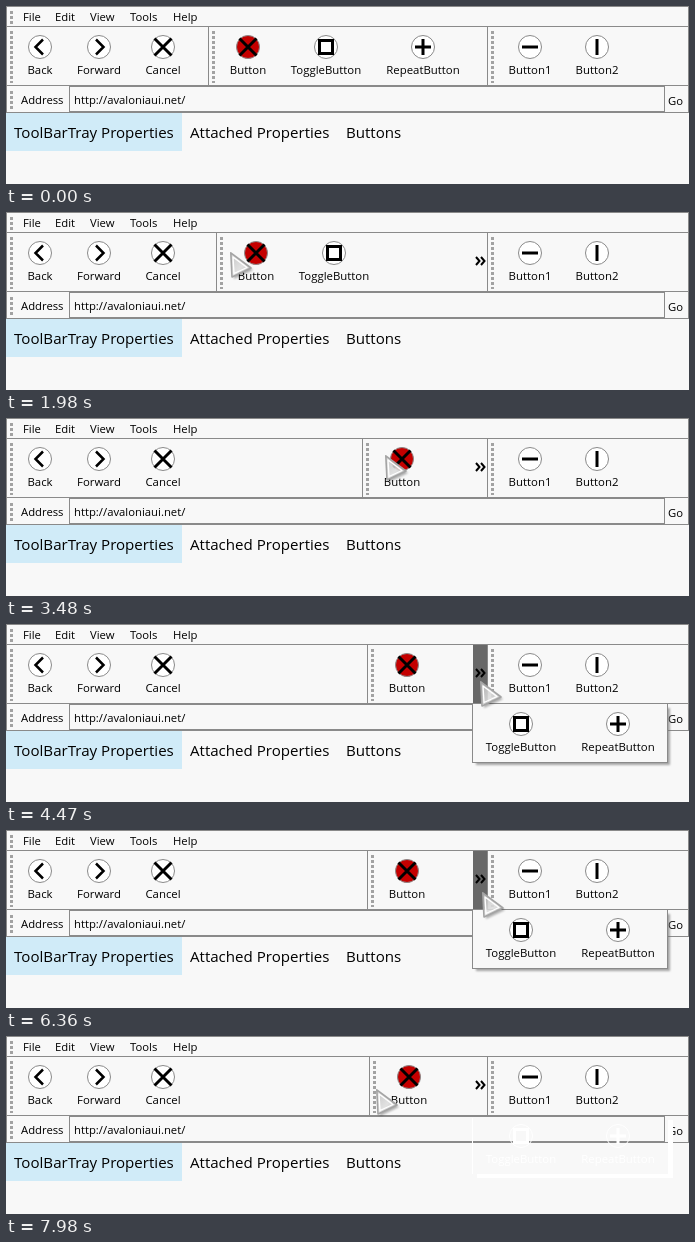
Recreate the animation shown at these times as an HTML page. Size 683x178 px, loop 8 s.

```html
<!DOCTYPE html>
<html lang="en">
<head>
<meta charset="utf-8">
<title>Toolbar tray</title>
<style>
html, body { margin: 0; width: 100%; height: 100%; overflow: hidden; background: #f8f8f8; }
svg { display: block; color: #000; --ring: #8a8a8a; --disc: #fff; }
text { font: 11.3px "Open Sans", "Noto Sans", sans-serif; fill: currentColor; }
.icon text { font-size: 11.4px; text-anchor: middle; }
.tab text { font-size: 15.1px; }
.line { fill: none; stroke: #8a8a8a; shape-rendering: crispEdges; }
.grip { fill: none; stroke: #a2a2a2; stroke-width: 3; stroke-dasharray: 3 2; shape-rendering: crispEdges; }
.icon circle { fill: var(--disc); stroke: var(--ring); }
.icon path { fill: none; stroke: currentColor; stroke-width: 3; }
.icon .thin { stroke-width: 2.5; }
#ghost { color: #fff; --ring: #fff; --disc: none; }
</style>
</head>
<body>
<svg width="683" height="178" viewBox="0 0 683 178">
  <defs>
    <linearGradient id="shine" x1="0" y1="0" x2="1" y2="1">
      <stop offset="0" stop-color="#ccc"/>
      <stop offset=".55" stop-color="#eee"/>
      <stop offset="1" stop-color="#c4c4c4"/>
    </linearGradient>
    <filter id="blur" x="-30%" y="-30%" width="160%" height="160%"><feGaussianBlur stdDeviation="1.2"/></filter>
    <g id="toggleBtn" class="icon">
      <circle r="11.5"/><path d="M-6.5 -6.5H6.5V6.5H-6.5Z"/><text y="27">ToggleButton</text>
    </g>
    <g id="repeatBtn" class="icon">
      <circle r="11.5"/><path d="M-8 0H8M0 -8V8"/><text y="27">RepeatButton</text>
    </g>
    <path id="cross" d="M-8.5 -8.5L8.5 8.5M8.5 -8.5L-8.5 8.5"/>
    <g id="extras">
      <use href="#toggleBtn" x="515" y="100"/>
      <use href="#repeatBtn" x="612" y="100"/>
    </g>
  </defs>

  <path class="line" d="M.5 106.5V.5H682.5V106.5ZM0 20.5H683M0 79.5H683M481.5 20V80M63.5 80.5H658.5V105.5H63.5Z"/>
  <path class="grip" d="M5.5 5V18M5.5 25V77M5.5 85V103M486.5 25V77"/>

  <text x="17" y="15">File</text>
  <text x="49" y="15">Edit</text>
  <text x="84" y="15">View</text>
  <text x="124" y="15">Tools</text>
  <text x="167" y="15">Help</text>
  <text x="15" y="98">Address</text>
  <text x="68" y="98">http://avaloniaui.net/</text>
  <text x="662" y="99">Go</text>

  <g class="icon">
    <g transform="translate(34 41)"><circle r="11.5"/><path class="thin" d="M3 -7.5L-4.500 0L3 7.5"/><text y="27">Back</text></g>
    <g transform="translate(93 41)"><circle r="11.5"/><path class="thin" d="M-3 -7.5L4.500 0L-3 7.5"/><text y="27">Forward</text></g>
    <g transform="translate(157 41)"><circle r="11.5"/><path d="M-8.5 -8.5L8.5 8.5M8.5 -8.5L-8.5 8.5"/><text y="27">Cancel</text></g>
    <g transform="translate(524 41)"><circle r="11.5"/><path d="M-8 0H8"/><text y="27">Button1</text></g>
    <g transform="translate(591 41)"><circle r="11.5"/><path d="M0 -8V8"/><text y="27">Button2</text></g>
  </g>

  <g id="bar">
    <path class="line" d="M202.5 20V80"/>
    <path class="grip" d="M207.5 25V77"/>
    <g class="icon" style="--disc:#c40000" transform="translate(242 41)">
      <circle r="11.5"/><path d="M-8.5 -8.5L8.5 8.5M8.5 -8.5L-8.5 8.5"/><text y="27">Button</text>
    </g>
    <use id="toggle" href="#toggleBtn" x="320" y="41"/>
    <use id="repeat" href="#repeatBtn" x="417" y="41"/>
  </g>

  <g id="more">
    <rect id="pressed" x="467" y="21" width="14" height="59" fill="#686868"/>
    <path d="M470 45L473.5 49L470 53M475 45L478.5 49L475 53" fill="none" stroke="#000" stroke-width="2"/>
  </g>

  <g class="tab">
    <rect y="107" width="176" height="38" fill="#d0ebf8"/>
    <text x="8" y="132">ToolBarTray Properties</text>
    <text x="184" y="132">Attached Properties</text>
    <text x="340" y="132">Buttons</text>
  </g>

  <g id="popup">
    <rect x="470" y="84" width="194" height="57" fill="#777" opacity=".65" filter="url(#blur)"/>
    <rect x="466.5" y="79.5" width="195" height="59" fill="#f8f8f8" stroke="#8a8a8a"/>
    <rect id="hover" x="467" y="80" width="97" height="58" fill="#686868"/>
    <use href="#extras"/>
  </g>
  <g id="ghost">
    <path d="M662 84H667V142H471V138H662Z" fill="#fff"/>
    <path d="M466.5 82V138" stroke="#fff"/>
    <use href="#extras"/>
  </g>

  <g id="cursor">
    <path d="M2 3L4 27L23 18Z" fill="#000" opacity=".3" filter="url(#blur)"/>
    <path d="M.8 .8L2 25L21 16Z" fill="url(#shine)" fill-opacity=".8" stroke="#a4a4a4" stroke-width="1.6" stroke-linejoin="round"/>
    <path d="M3 5L4 21.5L17 15.5Z" fill="none" stroke="#fff" stroke-width="1.3" stroke-linejoin="round"/>
  </g>
</svg>
<script>
const LOOP = 8000, STEP = 30;
const GRAB = 1740, DROP = 3930, REGRAB = 7830;
const $ = id => document.getElementById(id);

// pointer moves: start, end, x, y; it rests in between
const moves = [
  [300, 1080, 221, 41], [1080, 1380, 207, 41],
  [GRAB, 2550, 287, 38], [2580, 3360, 372, 36], [3390, DROP, 470, 53],
  [4410, 4740, 514, 97], [4920, 5100, 440, 76], [5100, 5520, 487, 54], [5520, 5700, 490, 57],
  [5880, 6120, 497, 78], [6120, 6360, 476, 62],
  [6630, 6840, 387, 30], [6990, 7590, 368, 53], [REGRAB, 8100, 372, 53]
];

const clamp = (v, lo, hi) => Math.min(hi, Math.max(lo, v));

function pointer(t) {
  let x = 664, y = -24;
  for (const [start, end, toX, toY] of moves) {
    const p = clamp((t - start) / (end - start), 0, 1);
    const s = p * p * (3 - 2 * p);
    x += (toX - x) * s;
    y += (toY - y) * s;
  }
  return [x, y];
}

// the toolbar trails the pointer by up to 20px and stops at its limit
function barOffset(t) {
  const pull = Math.max(0, pointer(clamp(t, GRAB, DROP))[0] - 207);
  const again = pointer(Math.max(t, REGRAB))[0] - 368;
  return Math.round(Math.min(159, pull * pull / (pull + 20)) + again);
}

const show = (id, on) => { $(id).style.display = on ? "" : "none"; };
const move = (id, x, y) => $(id).setAttribute("transform", `translate(${Math.round(x)} ${Math.round(y)})`);

function draw(now) {
  const t = Math.floor(now % LOOP / STEP) * STEP;
  const d = barOffset(t);
  move("cursor", ...pointer(t));
  move("bar", d, 0);
  show("cursor", t >= 300);
  show("repeat", d < 1);
  show("toggle", d < 98);
  show("more", d > 0);
  show("pressed", t >= 4080 && t < 6450);
  show("popup", t >= 4140 && t < 6450);
  show("hover", t >= 4560 && t < 6120);
  show("ghost", t >= 6450);
  requestAnimationFrame(draw);
}
draw(0);
</script>
</body>
</html>
```
